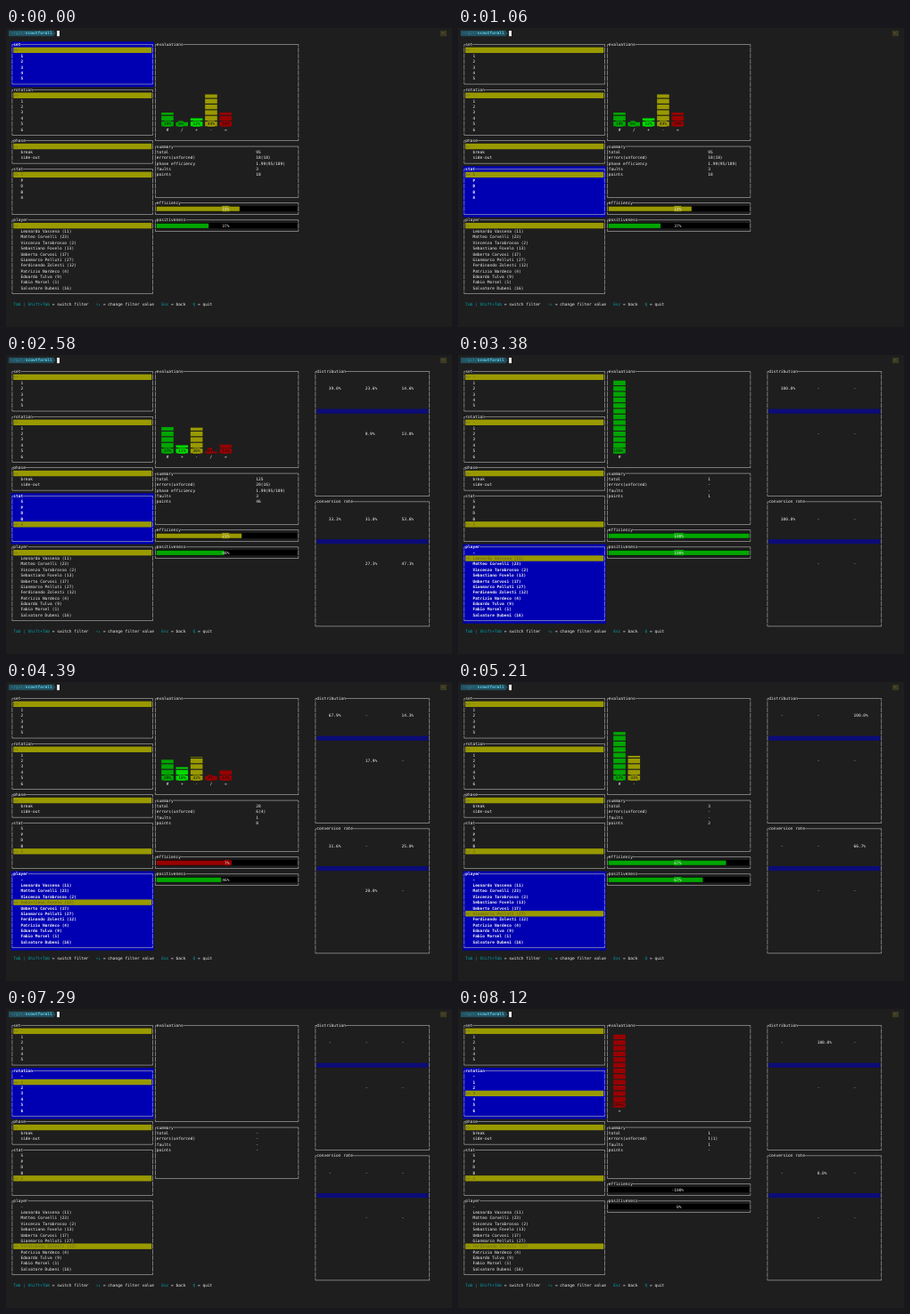
Recreate the animation shown at these times as an HTML page with a canvas. Size 500 by 336 pixels, loop 8540 ms.

```html
<!DOCTYPE html>
<html lang="en">
<head>
<meta charset="utf-8">
<title>Scouting dashboard</title>
<style>
html, body { margin: 0; width: 100%; height: 100%; overflow: hidden; background: #1e1e1e; }
canvas { display: block; width: 500px; height: 336px; }
</style>
</head>
<body>
<canvas id="term"></canvas>
<script>
const canvas = document.getElementById('term');
const ctx = canvas.getContext('2d');

// Terminal grid
const CW = 2.72, RH = 6.364, BLOCK = 5.2;
const colX = c => 5.55 + c * CW;
const rowY = r => 18.5 + r * RH;

const C = {
  bg: '#1e1e1e', fg: '#f2f2f2', line: '#b8b8b8', focus: '#0000b2', dim: '#6a6a28',
  red: '#990000', green: '#00a600', lime: '#00d900', yellow: '#999900',
  cyan: '#00a6b2', net: '#0c0c78'
};

const LISTS = [
  { title: 'set', top: 0, bottom: 7, items: ['-', '1', '2', '3', '4', '5'] },
  { title: 'rotation', top: 8, bottom: 16, items: ['-', '1', '2', '3', '4', '5', '6'] },
  { title: 'phase', top: 17, bottom: 21, items: ['-', 'break', 'side-out'] },
  { title: 'stat', top: 22, bottom: 30, items: ['S', 'P', 'D', 'B', 'A'] },
  { title: 'player', top: 31, bottom: 44, items: [
    '-', 'Leonardo Vassena (11)', 'Matteo Corvelli (23)', 'Vincenzo Tarabrosso (2)',
    'Sebastiano Fovelo (13)', 'Umberto Carvosi (17)', 'Gianmarco Pelluti (27)',
    'Ferdinando Zolesti (12)', 'Patrizio Nardeco (4)', 'Edoardo Tulva (9)',
    'Fabio Morsel (1)', 'Salvatore Dubeni (16)'] }
];

const PHASE = '1.99(95/189)';
const blank = '- - - - -';

// bars: mark and count; dist / conv: three front zones, two back zones
const VIEWS = {
  serve: { total: 95, bars: { '#': 18, '/': 6, '+': 11, '-': 42, '=': 18 }, slash: C.green,
    err: '18(18)', phase: PHASE, faults: 3, points: 18, eff: 18, pos: 37 },
  pass: { total: 92, bars: { '#': 28, '+': 24, '-': 31, '/': 3, '=': 6 },
    err: '6(6)', phase: PHASE, faults: 2, points: '-', eff: 50, pos: 57 },
  dig: { total: 74, bars: { '#': 20, '+': 18, '-': 25, '/': 3, '=': 8 },
    err: '8(8)', phase: PHASE, faults: 1, points: '-', eff: 41, pos: 51 },
  block: { total: 46, bars: { '#': 10, '+': 11, '-': 13, '/': 2, '=': 10 },
    err: '10(4)', phase: PHASE, faults: 2, points: 10, eff: 20, pos: 46 },
  attack: { total: 125, bars: { '#': 46, '+': 14, '-': 45, '/': 4, '=': 16 },
    err: '20(16)', phase: PHASE, faults: 3, points: 46, eff: 21, pos: 48,
    dist: '39.0% 23.6% 14.6% 8.9% 13.8%', conv: '33.3% 31.0% 53.6% 27.3% 47.1%' },
  single: { total: 1, bars: { '#': 1 }, err: '-', faults: '-', points: 1, eff: 100, pos: 100,
    dist: '100.0% - - - -', conv: '100.0% - - - -' },
  none: { total: '-', bars: {}, err: '-', faults: '-', points: '-', dist: blank, conv: blank },
  left: { total: 28, bars: { '#': 8, '+': 5, '-': 9, '/': 2, '=': 4 },
    err: '6(4)', faults: 1, points: 8, eff: 7, pos: 46,
    dist: '67.9% - 14.3% 17.9% -', conv: '31.6% - 25.0% 20.0% -' },
  mixed: { total: 8, bars: { '#': 3, '+': 1, '-': 3, '=': 1 },
    err: '1(1)', faults: '-', points: 3, eff: 25, pos: 50,
    dist: '25.0% - 50.0% - 25.0%', conv: '50.0% - 25.0% - 50.0%' },
  right: { total: 3, bars: { '#': 2, '-': 1 }, err: '-', faults: '-', points: 2, eff: 67, pos: 67,
    dist: '- - 100.0% - -', conv: '- - 66.7% - -' },
  pair: { total: 2, bars: { '-': 1, '=': 1 }, err: '1(1)', faults: 2, points: '-', eff: -50, pos: 0,
    dist: '- 100.0% - - -', conv: '- 0.0% - - -' },
  kept: { total: 1, bars: { '-': 1 }, err: '-', faults: 1, points: '-', eff: 0, pos: 0,
    dist: '- 100.0% - - -', conv: '- 0.0% - - -' },
  lost: { total: 1, bars: { '=': 1 }, err: '1(1)', faults: 1, points: '-', eff: -100, pos: 0,
    dist: '- 100.0% - - -', conv: '- 0.0% - - -' }
};

// time, focused list, rotation, stat, player, view
const LOOP = 8540;
const STEPS = [
  [0, 0, 0, 0, 0, 'serve'], [440, 1, 0, 0, 0, 'serve'],
  [860, 2, 0, 0, 0, 'serve'], [1060, 3, 0, 0, 0, 'serve'],
  [1330, 3, 0, 1, 0, 'pass'], [1730, 3, 0, 2, 0, 'dig'],
  [2160, 3, 0, 3, 0, 'block'], [2580, 3, 0, 4, 0, 'attack'],
  [2980, 4, 0, 4, 0, 'attack'], [3380, 4, 0, 4, 1, 'single'],
  [3570, 4, 0, 4, 2, 'none'], [4010, 4, 0, 4, 3, 'none'],
  [4390, 4, 0, 4, 4, 'left'], [4780, 4, 0, 4, 5, 'mixed'],
  [5210, 4, 0, 4, 6, 'right'], [5650, 4, 0, 4, 7, 'pair'],
  [6070, 3, 0, 4, 7, 'pair'], [6470, 2, 0, 4, 7, 'pair'],
  [6890, 1, 0, 4, 7, 'pair'], [7290, 1, 1, 4, 7, 'none'],
  [7680, 1, 2, 4, 7, 'kept'], [8120, 1, 3, 4, 7, 'lost']
];

function rect(x, y, w, h, color) {
  ctx.fillStyle = color;
  ctx.fillRect(x, y, w, h);
}

// Background of whole cells
function cells(c, r, w, color, h = 1) {
  rect(colX(c), rowY(r) - RH / 2, w * CW, h * RH, color);
}

// Block glyphs are shorter than a cell, which leaves a gap between rows
function blocks(c, r, w, color, part = 1) {
  const h = BLOCK * part;
  rect(colX(c), rowY(r) + 2.75 - h, w * CW, h, color);
}

function text(c, r, str, color = C.fg, bold = false) {
  ctx.font = `${bold ? 'bold ' : ''}4.52px "DejaVu Sans Mono", monospace`;
  ctx.fillStyle = color;
  ctx.fillText(str, colX(c), rowY(r) + 1.6);
}

function frame(c0, c1, r0, r1, title, bold) {
  const x0 = colX(c0 + 0.5), x1 = colX(c1 + 0.5), y0 = rowY(r0), y1 = rowY(r1);
  const tx = colX(c0 + 1 + title.length), t = 0.6;
  rect(tx, y0 - t / 2, x1 - tx, t, C.line);
  rect(x0, y0 - t / 2, CW / 2, t, C.line);
  rect(x0, y1 - t / 2, x1 - x0, t, C.line);
  for (const x of [x0, x1]) {
    rect(x - t / 2, y0, t, 2.8, C.line);
    rect(x - t / 2, y1 - 2.6, t, 2.6, C.line);
    for (let r = r0 + 1; r < r1; r++) rect(x - t / 2, rowY(r) - 2.7, t, 5.5, C.line);
  }
  text(c0 + 1, r0, title, C.fg, bold);
}

function drawList({ title, top, bottom, items }, selected, focused) {
  if (focused) cells(0, top, 59, C.focus, bottom - top + 1);
  frame(0, 58, top, bottom, title, focused);
  items.forEach((item, i) => {
    const r = top + 1 + i;
    if (i === selected) {
      cells(1, r, 57, C.yellow);
      text(1, r, '>> ' + item, C.dim, focused);
    } else {
      text(4, r, item, C.fg, focused);
    }
  });
}

function drawBars({ bars, total, slash = C.red }) {
  const colors = { '#': C.green, '+': C.lime, '-': C.yellow, '/': slash, '=': C.red };
  frame(59, 118, 0, 17, 'evaluations');
  Object.entries(bars).forEach(([mark, n], i) => {
    const c = 62 + 6 * i, color = colors[mark];
    const label = Math.round(n / total * 100) + '%';
    const eighths = Math.round(n / total * 13 * 8);
    for (let k = 0; k * 8 < eighths; k++) {
      blocks(c, 14 - k, 5, color, Math.min(1, eighths / 8 - k));
    }
    const lc = c + Math.floor((5 - label.length) / 2);
    cells(lc, 14, label.length, color);
    text(lc, 14, label, '#101010');
    text(c + 2, 15, mark);
  });
}

function drawSummary(v) {
  const rows = [['total', v.total], ['errors(unforced)', v.err]];
  if (v.phase) rows.push(['phase efficiency', v.phase]);
  rows.push(['faults', v.faults], ['points', v.points]);
  frame(59, 118, 18, 27, 'summary');
  rows.forEach(([name, value], i) => {
    text(60, 19 + i, name);
    text(101, 19 + i, String(value));
  });
}

function drawGauge(top, title, value, ratio, color) {
  const label = value + '%', r = top + 1, width = 58;
  const lc = 60 + Math.floor((width - label.length) / 2);
  const fill = width * ratio;
  frame(59, 118, top, top + 2, title);
  cells(60, r, width, '#000');
  blocks(60, r, fill, color);
  const covered = Math.min(label.length, Math.floor(60 + fill - lc));
  if (covered > 0) cells(lc, r, covered, color);
  text(lc, r, label);
}

function drawCourt(top, title, values) {
  const v = values.split(' ');
  frame(125, 172, top, top + 22, title);
  blocks(126, top + 7, 46, C.net);
  [131, 146, 161].forEach((c, i) => text(c, top + 3, v[i]));
  [146, 161].forEach((c, i) => text(c, top + 11, v[3 + i]));
}

function drawPrompt() {
  rect(3, 2.8, 50.5, 6.4, '#23505f');
  ctx.beginPath();
  ctx.moveTo(53.5, 2.8);
  ctx.lineTo(55.6, 6);
  ctx.lineTo(53.5, 9.2);
  ctx.fill();
  text(0, -2, '~/git/', '#3f93a5');
  text(6, -2, 'scoutforall', '#5fd7f0', true);
  rect(57.2, 3, 2.8, 6.2, '#ffffff');
  rect(487, 3, 7, 6.2, '#3d3a22');
  text(177.6, -2, '~', '#8a8030');
}

function drawHelp() {
  [[1, 'Tab | Shift+Tab', '= switch filter'], [35, '↑↓', '= change filter value'],
   [62, 'Esc', '= back'], [75, 'Q', '= quit']].forEach(([c, key, what]) => {
    text(c, 45.9, key, C.cyan);
    text(c + key.length + 1, 45.9, what);
  });
}

function draw([, focus, rotation, stat, player, name]) {
  const v = VIEWS[name];
  const selected = [0, rotation, 0, stat, player];
  rect(0, 0, 500, 336, C.bg);
  drawPrompt();
  LISTS.forEach((list, i) => drawList(list, selected[i], i === focus));
  drawBars(v);
  drawSummary(v);
  if (v.eff !== undefined) {
    const color = v.eff < 10 ? C.red : v.eff < 30 ? C.yellow : C.green;
    drawGauge(28, 'efficiency', v.eff, (v.eff + 100) / 200, color);
    drawGauge(31, 'positiveness', v.pos, v.pos / 100, C.green);
  }
  if (v.dist) {
    drawCourt(0, 'distribution', v.dist);
    drawCourt(23, 'conversion rate', v.conv);
  }
  drawHelp();
}

const scale = window.devicePixelRatio || 1;
canvas.width = 500 * scale;
canvas.height = 336 * scale;
ctx.scale(scale, scale);
ctx.textRendering = 'geometricPrecision';

const start = performance.now();
let shown = null;
function tick() {
  const t = (performance.now() - start) % LOOP;
  const step = STEPS.findLast(s => s[0] <= t);
  if (step !== shown) draw(shown = step);
  requestAnimationFrame(tick);
}
tick();
</script>
</body>
</html>
```
